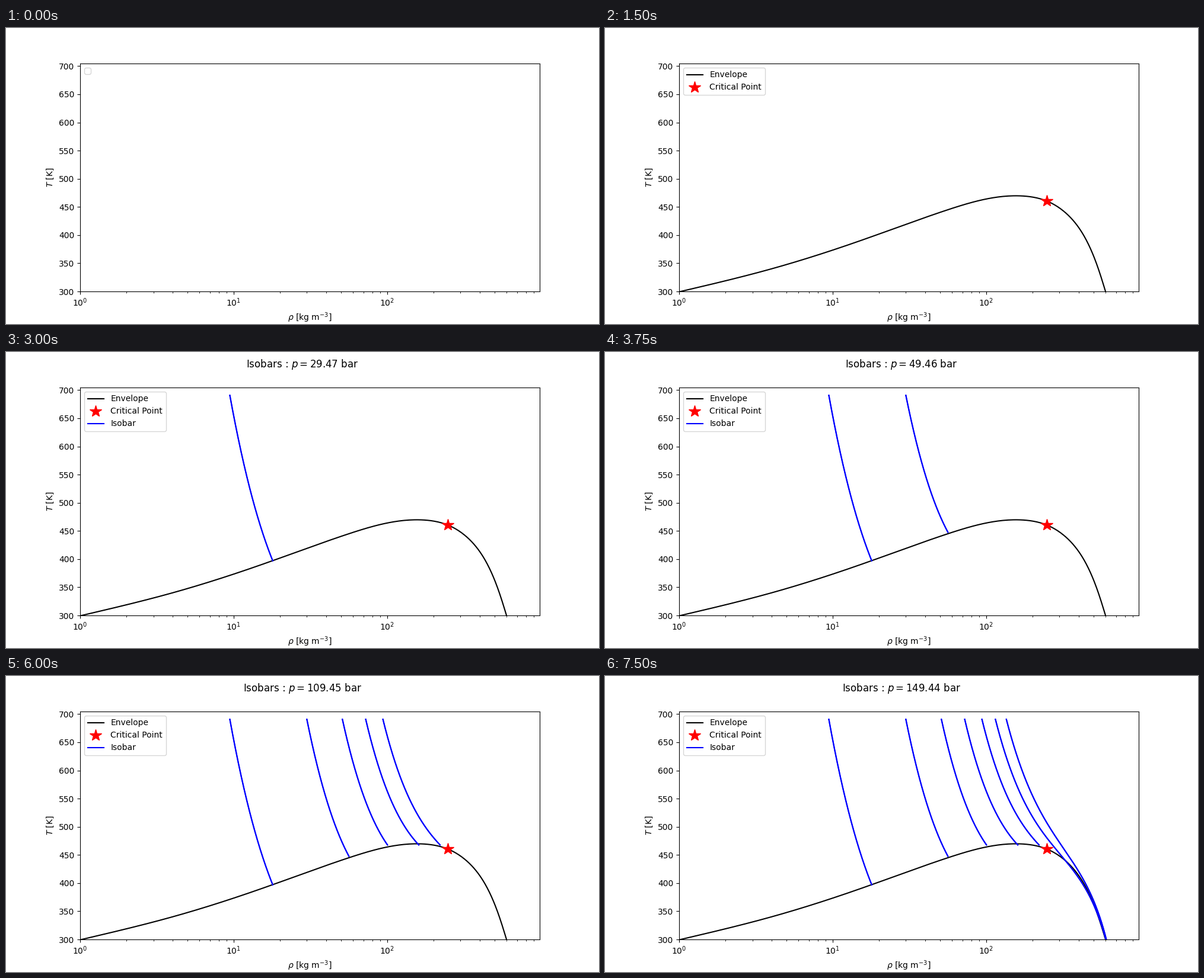
Animation of 1000x500 px, one loop 8000 ms. Source, as a matplotlib script:

```python
import numpy as np
import matplotlib.pyplot as plt
from matplotlib.animation import FuncAnimation

INTERVAL = 250        # ms per frame
HOLD = 3              # frames per step of the story
FRAMES = 32

T_CRIT, RHO_CRIT, P_CRIT = 460.53, 248, 94.715
T_TOP = 1.5 * T_CRIT
PRESSURES = P_CRIT * np.linspace(0.1, 2, 10)      # bar

# Cubic equation of state per kilogram: gas constant and covolume
R_GAS, COVOLUME = 146.786, 0.00122

# Lowest temperature on each isobar
T_ENDS = [397.2, 447.7, 467.8, 467.8, 467.8, 298, 298]

# Envelope as (log10 rho, T)
KNOTS = [(0, 299.3), (0.6, 340), (1.2, 392), (1.75, 445), (2.2, 469.8),
         (2.395, 460.5), (2.55, 431), (2.68, 375.5), (2.7794, 298)]


def attraction(temp):
    return (33.201 - 0.6637 * np.sqrt(temp)) ** 2


def density(p, temp):
    """Vapour-like root of the Peng-Robinson equation (p in Pa)."""
    rt = R_GAS * temp
    a, b = attraction(temp) * p / rt ** 2, COVOLUME * p / rt
    z = np.roots([1, b - 1, a - 3 * b * b - 2 * b, b ** 3 + b * b - a * b])
    return p / (rt * z.real[abs(z.imag) < 1e-7].max())


def isobar(p_bar, t_end):
    temps = np.linspace(T_TOP, t_end, 150)
    return [density(p_bar * 1e5, t) for t in temps], temps


def spline(t, y, ts):
    """Natural cubic spline through (t, y), evaluated at ts."""
    h = np.diff(t)
    slope = np.diff(y) / h
    a, rhs = np.eye(len(t)), np.zeros(len(t))
    for i in range(1, len(t) - 1):
        a[i, i - 1:i + 2] = h[i - 1], 2 * (h[i - 1] + h[i]), h[i]
        rhs[i] = 6 * (slope[i] - slope[i - 1])
    m = np.linalg.solve(a, rhs)
    k = np.clip(np.searchsorted(t, ts) - 1, 0, len(h) - 1)
    u = ts - t[k]
    first = slope[k] - h[k] * (2 * m[k] + m[k + 1]) / 6
    return y[k] + u * (first + u * (m[k] / 2 + u * (m[k + 1] - m[k]) / (6 * h[k])))


def envelope():
    x, temp = np.array(KNOTS).T
    chord = np.hypot(np.diff(x) * 259, np.diff(temp))
    s = np.concatenate([[0], np.cumsum(chord)])
    ss = np.linspace(0, s[-1], 300)
    return 10 ** spline(s, x, ss), spline(s, temp, ss)


fig, ax = plt.subplots(figsize=(10, 5), dpi=100)
ax.set_xscale("log")
ax.set_xlim(1, 985)
ax.set_ylim(300, 1.02 * T_TOP)
ax.set_xlabel(r"$\rho$ [kg m$^{-3}$]")
ax.set_ylabel(r"$T$ [K]")

dome, = ax.plot(*envelope(), "k", label="Envelope")
star, = ax.plot([RHO_CRIT], [T_CRIT], "r*", markersize=15, label="Critical Point")
isobars = []
for p, t_end in zip(PRESSURES, T_ENDS):
    curve = isobar(p, t_end)
    # two strokes on top of each other give the heavier line
    isobars.append(ax.plot(*curve, "b", *curve, "b", label="Isobar"))
title = fig.suptitle("")


def update(frame):
    step = frame // HOLD
    shown = max(step - 3, 0)
    dome.set_visible(step >= 1)
    star.set_visible(step >= 2)
    for i, strokes in enumerate(isobars):
        for line in strokes:
            line.set_visible(i < shown)
    title.set_text(f"Isobars : $p = {PRESSURES[shown]:.2f}$ bar" if step >= 3 else "")
    keys = [a for a in (dome, star, isobars[0][0]) if a.get_visible()]
    ax.legend(handles=keys, loc="upper left")
    return []


anim = FuncAnimation(fig, update, frames=FRAMES, interval=INTERVAL,
                     repeat=True, repeat_delay=0, blit=False)
plt.show()
```
